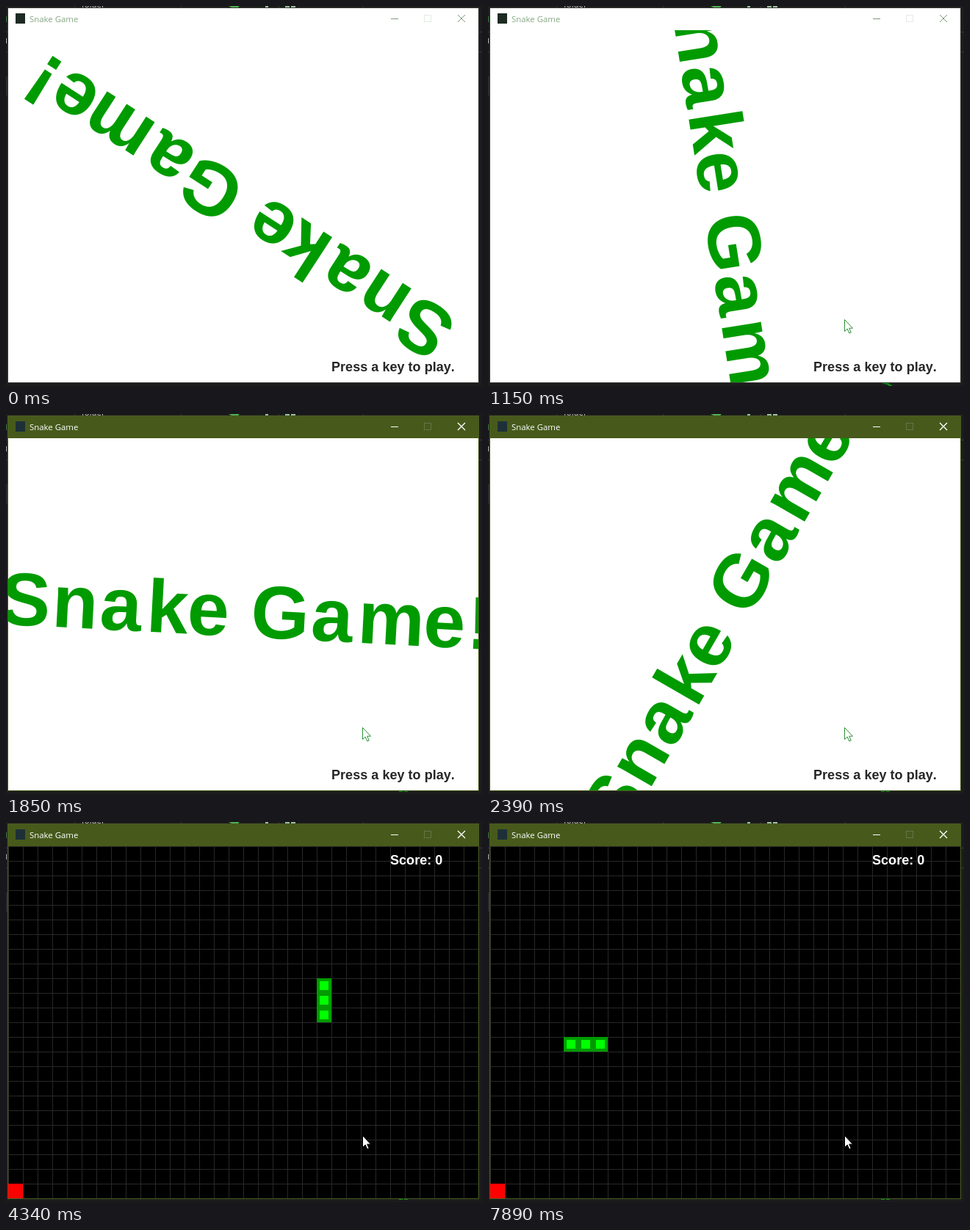
An HTML page that plays this animation: 648 px wide and 518 px high, repeating every 8000 ms.

```html
<!DOCTYPE html>
<html lang="en">
<head>
<meta charset="utf-8">
<title>Snake Game</title>
<style>
  html, body { margin: 0; width: 100%; height: 100%; overflow: hidden; background: #1c1c1c; }
  svg { display: block; width: 648px; height: 518px; }
  rect, .crisp { shape-rendering: crispEdges; }
  .ui { font: 11.4px "Open Sans", "Noto Sans", sans-serif; }
  .bold { font: bold 18px "Liberation Sans", Arial, sans-serif; font-kerning: none; letter-spacing: .04px; }
  .big { font-size: 102px; fill: #009b00; letter-spacing: 2.8px; word-spacing: -4px; }

  #win { --bar: #fff; --edge: #3a3d38; --ink: #86a886; --btn: #7c9a7c; --dim: #e3eae3; --icon: #1d2b22; }
  #win.active { --bar: #475a1b; --edge: #4a5c22; --ink: #fff; --btn: #fff; --dim: #64754a; --icon: #1d3038; }
  #bar { fill: var(--bar); }
  #edge { fill: none; stroke: var(--edge); }
  #name { fill: var(--ink); }
  #icon { fill: var(--icon); }
  .btn { fill: none; stroke: var(--btn); }
  .dim { stroke: var(--dim); }
  .active .close { stroke-width: 1.4; }
</style>
</head>
<body>
<svg viewBox="0 0 648 518">
  <defs>
    <clipPath id="view"><rect x="3" y="33" width="640" height="480"/></clipPath>
  </defs>

  <!-- desktop behind the window -->
  <rect width="648" height="518" fill="#1c1c1c"/>
  <path class="crisp" d="M93.5 0v3M238.5 0v3M371.5 0v3M486.5 0v3M0 35.5h3M0 62.5h3M644 35.5h4M644 62.5h4" stroke="#383838"/>
  <rect y="96" width="2" height="26" fill="#2c2c2c"/>
  <rect y="44" width="1" height="7" fill="#b8b8b8"/>
  <rect y="14" width="1" height="8" fill="#3f7a3f"/>
  <text class="ui" x="103" y="2" fill="#c4c4c4">folder</text>
  <path d="M303 0h15l-3 3h-6z" fill="#4fae4f"/>
  <path class="crisp" d="M353 .5h4M380 1h6M388 1h6" stroke="#9dbb9d" stroke-width="2"/>
  <path id="smear" d="M535 514h10l6 4h-5l-3-2z" fill="#0b8a16"/>
  <path id="dashes" class="crisp" d="M535 514.5h5M542 514.5h5" stroke="#0b8a16"/>

  <g id="win">
    <rect id="bar" x="3" y="3" width="640" height="30"/>
    <rect id="edge" x="2.5" y="2.5" width="641" height="511"/>
    <rect id="icon" x="13" y="10" width="13" height="14"/>
    <text id="name" class="ui" x="32" y="21.5">Snake Game</text>
    <path class="btn crisp" d="M524 17.5h10"/>
    <rect class="btn dim" x="569.5" y="12.5" width="9" height="9"/>
    <path class="btn close" d="M615 12l10 10M625 12l-10 10"/>
  </g>

  <g id="intro" clip-path="url(#view)">
    <rect x="3" y="33" width="640" height="480" fill="#fff"/>
    <g id="spin"><text class="bold big" x="-331" y="30.5" dx="0 0 0 4 -4 0 0 0 4 -4">Snake Game!</text></g>
    <text class="bold" x="443" y="498" fill="#262626">Press a key to play.</text>
  </g>

  <g id="game" clip-path="url(#view)">
    <rect x="3" y="33" width="640" height="480"/>
    <path id="grid" class="crisp" stroke="#282828"/>
    <g id="snake"></g>
    <rect x="3" y="493" width="20" height="20" fill="#f00"/>
    <text class="bold" x="523" y="58" fill="#fff">Score: 0</text>
  </g>

  <path id="cursor" d="M.5 .5v16l3.7-3.4 2.6 5.9 2.4-1-2.5-5.8h4.8z" fill="#fff"/>
</svg>

<script>
const LOOP = 8000, PLAY = 2730, FOCUS = 1500, TURN = 3;
const $ = id => document.getElementById(id);
const CELL = 20, LEFT = 3, TOP = 33;

// [time, redraw count, step]; redraws between rows are evenly spaced
const spinKeys = [
  [0, 0, 49], [70, 1, 52], [1070, 16, 90], [1150, 17, 93], [1220, 18, 96],
  [1850, 28, 119], [1930, 29, 122], [2190, 33, 132], [2260, 34, 135],
  [2390, 36, 140], [2450, 37, 142], [2650, 40, 150]
];
const moveKeys = [
  [2730, 0, 0], [3130, 2, 2], [3320, 3, 3], [4340, 8, 8], [4550, 9, 9],
  [5550, 14, 14], [5750, 15, 15], [6290, 18, 18], [6570, 19, 19],
  [7090, 22, 22], [7370, 23, 23], [7890, 26, 26]
];

function expand(keys) {
  const out = [];
  keys.forEach(([t, n, s], i) => {
    const [t1, n1, s1] = keys[i + 1] || [t, n + 1, s];
    for (let k = 0; k < n1 - n; k++) {
      const p = k / (n1 - n);
      out.push([Math.round((t + (t1 - t) * p) / 10) * 10, Math.round(s + (s1 - s) * p)]);
    }
  });
  return out;
}

function stepAt(list, t) {
  let step = list[0][1];
  for (const [at, s] of list) if (at <= t) step = s;
  return step;
}

const spins = expand(spinKeys), moves = expand(moveKeys);

// right along row 8, down column 21, then left along row 13
function cell(k) {
  if (k <= 5) return [16 + k, 8];
  if (k <= 10) return [21, k + 3];
  return [31 - k, 13];
}

function addRect(parent, inset, fill) {
  const r = document.createElementNS("http://www.w3.org/2000/svg", "rect");
  r.setAttribute("x", inset);
  r.setAttribute("y", inset);
  r.setAttribute("width", CELL - 2 * inset);
  r.setAttribute("height", CELL - 2 * inset);
  r.setAttribute("fill", fill);
  parent.append(r);
}

const parts = [0, 1, 2].map(() => {
  const g = document.createElementNS("http://www.w3.org/2000/svg", "g");
  addRect(g, 0, "#009b00");
  addRect(g, 4, "#0f0");
  $("snake").append(g);
  return g;
});

let lines = "";
for (let x = 0; x < 640; x += CELL) lines += `M${LEFT + x + 0.5} ${TOP}v480`;
for (let y = 0; y < 480; y += CELL) lines += `M${LEFT} ${TOP + y + 0.5}h640`;
$("grid").setAttribute("d", lines);

const move = (el, x, y, extra = "") => el.setAttribute("transform", `translate(${x} ${y})${extra}`);
const show = (el, on) => el.setAttribute("visibility", on ? "visible" : "hidden");

function drawCursor(t, playing) {
  const p = Math.min(1, Math.max(0, (t - 650) / 320));
  const e = 1 - (1 - p) ** 2;
  const c = $("cursor");
  show(c, t >= 650);
  move(c, 545 - 60 * e, 514 - 87 * e);
  c.setAttribute("stroke", playing ? "#000" : "#2c8f36");
}

function draw(t) {
  const playing = t >= PLAY;
  show($("intro"), !playing);
  show($("game"), playing);
  $("win").classList.toggle("active", t >= FOCUS);
  show($("smear"), t >= 750 && t < FOCUS);
  show($("dashes"), t >= FOCUS);
  drawCursor(t, playing);

  if (playing) {
    const k = stepAt(moves, t);
    parts.forEach((g, i) => {
      const [x, y] = cell(k - i);
      move(g, LEFT + x * CELL, TOP + y * CELL);
    });
  } else {
    move($("spin"), 323, 273, ` rotate(${-TURN * stepAt(spins, t)})`);
  }
}

const start = performance.now();
function tick() {
  draw((performance.now() - start) % LOOP);
  requestAnimationFrame(tick);
}
tick();
</script>
</body>
</html>
```
